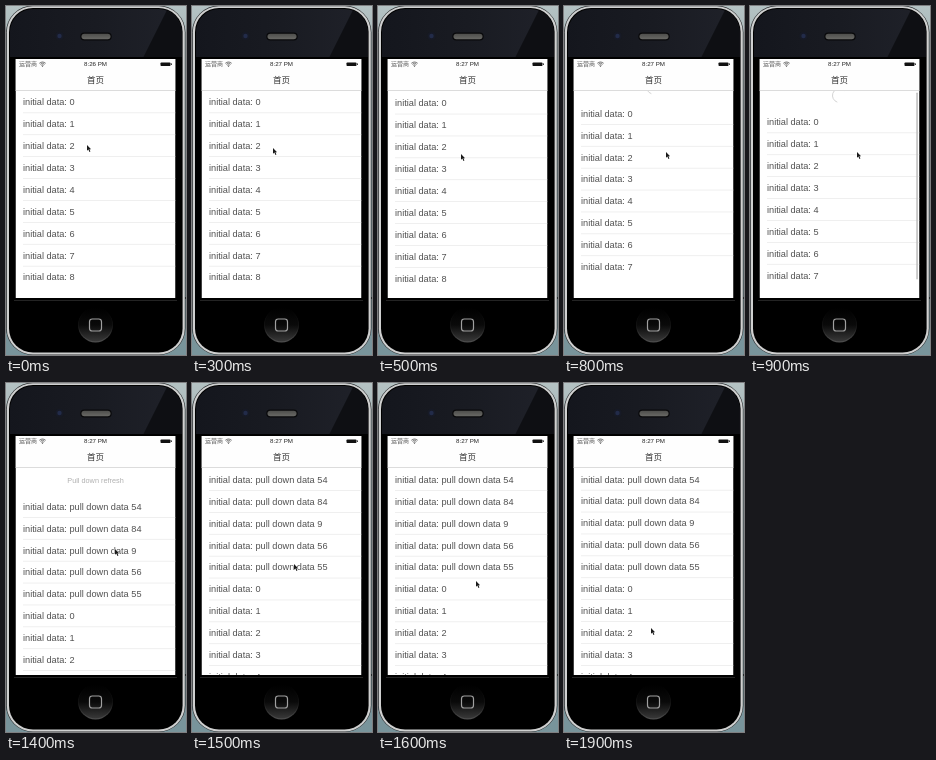
Recreate the animation shown at these times as an HTML page with a canvas. Size 180 px wide and 349 px high, loop 2.4 s.

```html
<!DOCTYPE html>
<html lang="en">
<head>
<meta charset="utf-8">
<title>Pull to refresh</title>
<style>
  html, body { margin: 0; width: 100%; height: 100%; overflow: hidden; background: #24292d; }
  canvas { display: block; width: 180px; height: 349px; }
</style>
</head>
<body>
<canvas id="stage"></canvas>
<script>
const W = 180, H = 349, LOOP = 2400;
const SCREEN = { x: 9.5, y: 53, w: 160, h: 239 };
const NAV_BOTTOM = 85, PITCH = 21.9;
const SANS = '"Liberation Sans", Arial, sans-serif';
const CJK = '"Noto Sans CJK SC", "Noto Sans CJK", sans-serif';

const canvas = document.getElementById('stage');
const ctx = canvas.getContext('2d');
const dpr = window.devicePixelRatio || 1;
canvas.width = W * dpr;
canvas.height = H * dpr;

// Each pose holds until the next: start time, list offset, pointer x, pointer y
const poses = [
  [0, 0, 81, 139], [300, 0, 81, 142], [400, 0.5, 82, 145], [500, 1.2, 83, 148],
  [800, 11.5, 102, 146], [900, 20, 107, 146], [1000, 27, 111, 146], [1100, 31.5, 115, 146],
  [1200, 30, 114, 152], [1300, 28, 112, 159],
  [1400, 27.5, 109, 166], [1500, 0.6, 102, 181], [1600, 0.6, 98, 198],
  [1700, 0.6, 94, 216], [1800, 0.6, 90, 233], [1900, 0.3, 87, 245]
];
const oldRows = Array.from({ length: 9 }, (_, i) => `${i}`);
const newRows = [54, 84, 9, 56, 55].map(n => `pull down data ${n}`).concat(oldRows);

function fillRect(x, y, w, h, color) {
  ctx.fillStyle = color;
  ctx.fillRect(x, y, w, h);
}

function fillRound(x, y, w, h, r, color) {
  ctx.fillStyle = color;
  ctx.beginPath();
  ctx.roundRect(x, y, w, h, r);
  ctx.fill();
}

function disc(x, y, r, color) {
  ctx.fillStyle = color;
  ctx.beginPath();
  ctx.arc(x, y, r, 0, Math.PI * 2);
  ctx.fill();
}

function gradient(x0, y0, x1, y1, ...colors) {
  const g = ctx.createLinearGradient(x0, y0, x1, y1);
  colors.forEach((c, i) => g.addColorStop(i / (colors.length - 1), c));
  return g;
}

function label(text, x, y, size, color, align = 'left', family = SANS) {
  ctx.font = `${size}px ${family}`;
  ctx.textAlign = align;
  ctx.fillStyle = color;
  ctx.fillText(text, x, y);
}

function drawPhone() {
  fillRect(0, 0, W, H, gradient(0, 0, 0, H, '#b4c2c3', '#82949a', '#78949b'));
  fillRect(0, 305 - 14, W, 2, '#20282b');

  fillRound(0, -0.5, 179.5, 349.5, 27, '#2a2d2f');
  fillRound(0.8, 0.2, 178, 348.2, 26, '#cfd0d0');
  fillRound(3, 2, 173.6, 344.6, 24, '#000');

  // Glossy forehead with a diagonal reflection
  ctx.save();
  ctx.beginPath();
  ctx.roundRect(4, 3, 171.6, 48, [23, 23, 0, 0]);
  ctx.clip();
  fillRect(0, 0, W, 52, gradient(0, 0, W, 0, '#14161d', '#191b22', '#20222a'));
  ctx.fillStyle = '#0e0f13';
  ctx.beginPath();
  ctx.moveTo(163, 0);
  ctx.lineTo(W, 0);
  ctx.lineTo(W, 52);
  ctx.lineTo(137, 52);
  ctx.fill();
  ctx.restore();
  fillRect(8, 294, 163, 0.8, '#2c2c2c');

  disc(53.5, 30, 4, '#171a26');
  disc(53.5, 30, 2.2, '#222b49');

  fillRound(74.3, 26.5, 31.4, 8, 4, '#08080a');
  fillRound(75.5, 27.7, 29, 5.6, 2.8, gradient(0, 27, 0, 34, '#4a4a48', '#6c6c68'));

  disc(89.5, 319, 17.5, gradient(0, 302, 0, 337, '#000', '#141414', '#505050'));
  disc(89.5, 318.5, 16.7, gradient(0, 302, 0, 336, '#000', '#0a0a0a', '#3a3a3a'));
  ctx.beginPath();
  ctx.roundRect(83.5, 313, 12, 12, 2.8);
  ctx.strokeStyle = '#a0a0a0';
  ctx.lineWidth = 1.2;
  ctx.stroke();
}

function drawBars(time) {
  fillRect(SCREEN.x, SCREEN.y, SCREEN.w, NAV_BOTTOM - SCREEN.y, '#fefefe');
  fillRect(SCREEN.x, NAV_BOTTOM - 0.8, SCREEN.w, 0.8, '#d4d4d4');

  label('运营商', 13, 60.2, 6, '#555', 'left', CJK);
  ctx.strokeStyle = '#555';
  ctx.lineWidth = 0.8;
  for (const r of [1.6, 3.1, 4.5]) {
    ctx.beginPath();
    ctx.arc(36.5, 60.5, r, -Math.PI * 0.75, -Math.PI * 0.25);
    ctx.stroke();
  }
  disc(36.5, 60.2, 0.6, '#555');

  label(time < 300 ? '8:26 PM' : '8:27 PM', 89.5, 60.4, 6.2, '#222', 'center');
  fillRound(154.5, 56.4, 10, 3.6, 0.8, '#111');
  fillRect(165, 57.4, 0.8, 1.6, '#111');

  label('首页', 89.5, 76.8, 8.5, '#333', 'center', CJK);
}

function drawHeader(time, offset) {
  const y = 69.5 + offset;
  if (time >= 1400) {
    if (time < 1500) label('Pull down refresh', 89.5, y + 2.8, 7.3, '#b0b0b0', 'center');
    return;
  }
  if (time < 800) return;
  const turn = Math.max(0, time - 1100) / 100 * 0.6;
  ctx.strokeStyle = '#cacaca';
  ctx.lineWidth = 0.8;
  ctx.beginPath();
  ctx.arc(89.5, y, 7, Math.PI * 0.6 + turn, Math.PI * 1.75 + turn);
  ctx.stroke();
}

function drawList(time, offset) {
  const refreshed = time >= 1400;
  const rows = refreshed ? newRows : oldRows.slice(0, time < 800 ? 9 : 8);
  rows.forEach((text, i) => {
    const top = NAV_BOTTOM + offset + i * PITCH;
    label(`initial data: ${text}`, 17, top + 14.2, 9.2, '#505050');
    if (i < rows.length - 1) fillRect(17, top + PITCH - 0.4, 152.5, 0.7, '#e8e8e8');
  });
  if (time >= 900 && time < 1400) fillRound(166.3, 86.5, 1.5, 187, 0.75, '#bcbcbc');
}

function drawPointer(x, y) {
  ctx.beginPath();
  [[0, 0], [0, 5.8], [1.4, 4.6], [2.4, 6.9], [3.4, 6.4], [2.4, 4.2], [4.1, 4.2]]
    .forEach(([dx, dy]) => ctx.lineTo(x + dx, y + dy));
  ctx.closePath();
  ctx.strokeStyle = '#fff';
  ctx.lineWidth = 0.8;
  ctx.stroke();
  ctx.fillStyle = '#1a1a1a';
  ctx.fill();
}

function draw(now) {
  const clock = now % LOOP;
  const [time, offset, x, y] = poses.findLast(p => p[0] <= clock);
  ctx.setTransform(dpr, 0, 0, dpr, 0, 0);
  drawPhone();

  ctx.save();
  ctx.beginPath();
  ctx.rect(SCREEN.x, SCREEN.y, SCREEN.w, SCREEN.h);
  ctx.clip();
  fillRect(SCREEN.x, SCREEN.y, SCREEN.w, SCREEN.h, '#fff');
  drawHeader(time, offset);
  drawList(time, offset);
  drawBars(time);
  ctx.restore();

  drawPointer(x, y);
}

const start = performance.now();
function tick() {
  draw(performance.now() - start);
  requestAnimationFrame(tick);
}
tick();
</script>
</body>
</html>
```
